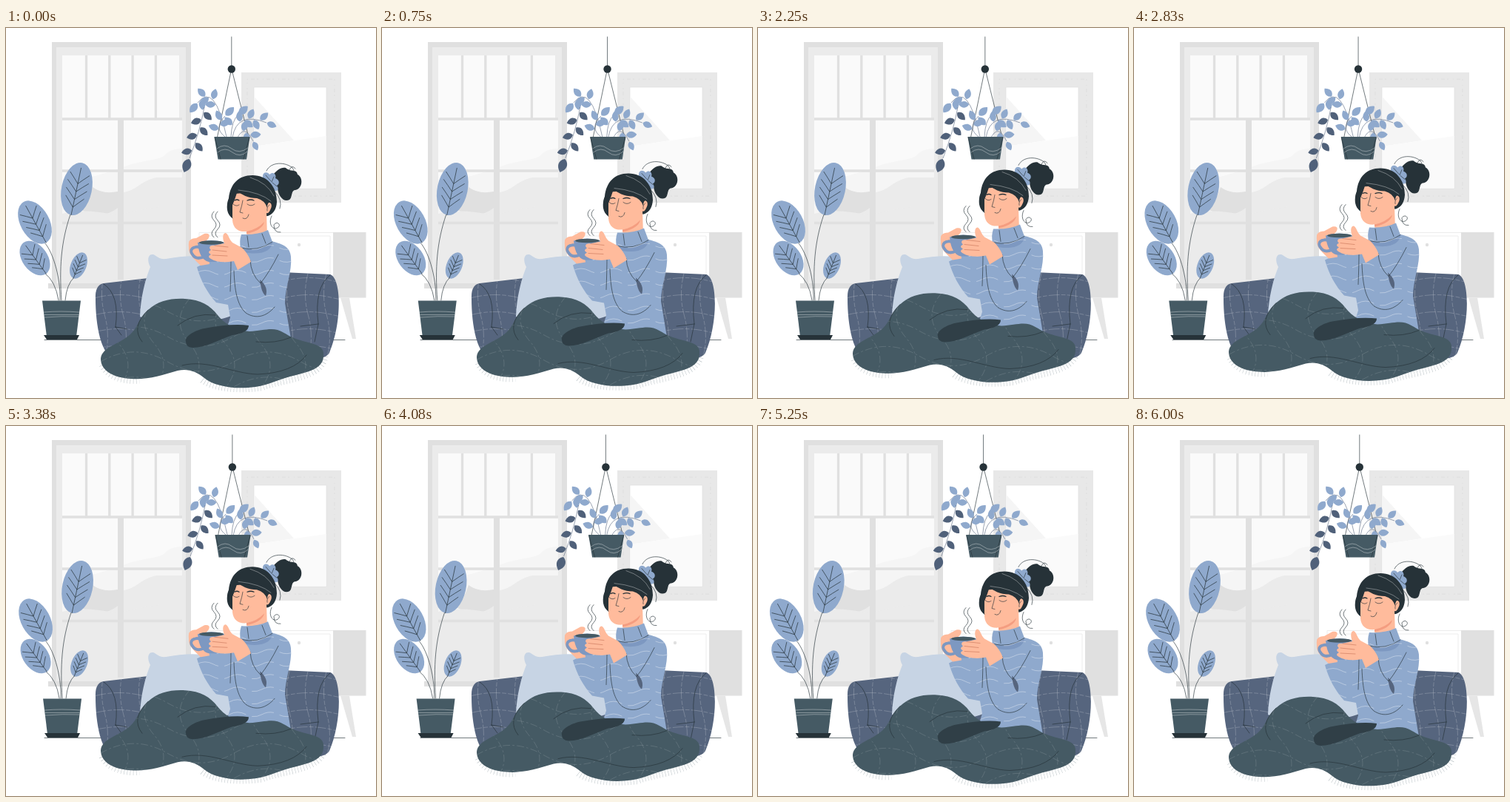
These frames come from a looping animation (500 px wide and 500 px high, 6.04 s). An HTML page:

```html
<!DOCTYPE html>
<html lang="en">
<head>
<meta charset="utf-8">
<title>Warm drink at home</title>
<style>
html,body{margin:0;width:100%;height:100%;overflow:hidden;background:#fff}
svg{display:block;width:100vw;height:100vh}
.ln{fill:none;stroke:#263238;stroke-width:.65;stroke-linecap:round}
.wh{fill:none;stroke:#fff;stroke-width:.6;stroke-linecap:round;opacity:.6}
.blue{fill:#8fa9cd}.cup{fill:#7d98c1}.slate{fill:#56657e}.teal{fill:#455a64}.ink{fill:#263238}.skin{fill:#ffbb9c}
.g0{fill:#e0e0e0}.g1{fill:#ebebeb}.g2{fill:#f5f5f5}.g3{fill:#fafafa}
</style>
</head>
<body>
<svg viewBox="0 0 500 500">
<defs>
<path id="sofa" d="M121 366Q120 347 132 345L192 338L250 330H374L438 333C454 338 454 400 437 439Q432 447 415 447H150C128 447 121 400 121 366Z"/>
<path id="body" d="M258 323L319 294L358 288C376 292 384 297 385 309C387 329 377 350 377 372L385 420L296 414L303 391L300 374L284 371C272 358 263 341 258 323Z"/>
<path id="throw" d="M128 447C129 431 154 427 168 414C179 404 178 394 192 381C205 369 222 365 242 366C263 367 276 375 286 388C295 399 306 407 329 410C345 409 357 405 367 408C380 413 383 418 398 422C414 427 431 428 429 443C429 459 412 464 392 469C369 474 357 482 337 485C309 489 281 484 268 473C257 464 246 460 232 463C211 469 190 476 169 474C147 473 128 464 128 447Z"/>
</defs>

<!-- window -->
<path class="g0" d="M62 19H250V345H254V352H57V345H62Z"/>
<path class="g1" d="M68 26H243V345H68Z"/>
<path class="g3" d="M76 37H234V123H238V262H76Z"/>
<path class="g2" d="M76 222C100 200 130 200 159 188C180 178 210 180 216 170Q224 163 238 163V262H76Z"/>
<path class="g1" d="M151 222C175 224 180 206 204 202H238V262H130Z"/>
<path class="g0" d="M102 246Q110 235 117 215Q130 225 151 221V243Q130 260 102 246Z"/>
<path class="g1" d="M76 251Q104 243 151 253Q200 240 238 240V345H76Z"/>
<g id="bars" fill="none" stroke="#e0e0e0" stroke-width="3.3"></g>
<path class="g0" d="M151 124H159V340H151Z"/>
<!-- picture -->
<path fill="#e8e8e8" d="M318 60H453V236H318Z"/>
<path fill="#fff" stroke="#e0e0e0" stroke-width=".7" d="M335 80H433V217H335Z"/>
<path class="g2" d="M335.500 93L389 152L335.500 160Z"/>
<path class="g3" d="M335.500 160L432.500 146V216.500H335.500Z"/>
<path fill="none" stroke="#dedede" stroke-dasharray="1 4 5 3 2 6" d="M326 69H444V227H326Z"/>
<!-- cabinet -->
<path fill="#fff" stroke="#ececec" d="M261 276.500H443V364H261ZM356 281H438V333H356ZM265 281H352V333H265Z"/>
<circle class="g0" cx="396" cy="293" r="2.200"/>
<path class="g0" d="M442 276H486.500V364.500H442Z"/>
<path fill="#e6e6e6" d="M452 364.500H464L473 420H468Z"/>
<path class="ln" d="M52 421.500H458"/>

<!-- hanging plant -->
<g class="sway">
<path class="ln" d="M304.800 12V55L285 150M304.800 55L328 148"/>
<circle class="ink" cx="304.800" cy="55.500" r="5.200"/>
<g id="vines"></g>
<path class="teal" d="M281.500 147H329.500L325 177.500H286.500Z"/>
<path class="ln" d="M282 148L290 177M329 148L321 177"/>
<path class="wh" d="M285 163q10-8 20 0t22-1M286 168q10-8 20 0t20-1"/>
</g>

<!-- floor plant -->
<g class="sway">
<path class="ln" d="M75 368C72 325 74 290 87 252M73 368C74 335 62 298 50 288M71 368Q67 342 52 331M80 368Q82 346 92 337"/>
<g id="foliage"></g>
<path class="teal" d="M49 368.500H101L95 417H55Z"/>
<path class="ink" d="M51 415H99L96 421H55Z"/>
<path class="wh" d="M51 384Q74 382 99 384M52 387.500H98M52 391Q76 389 98 390"/>
</g>

<!-- sofa -->
<use href="#sofa" class="slate"/>
<g id="sofaWeave"></g>
<path class="ln" d="M132 346Q154 360 148 404M148 404L164 407M148 404L156 415M438 334Q416 350 422 400M422 400L398 403M422 400L417 424"/>
<!-- cushion -->
<path fill="#c7d4e4" d="M181 390C182 364 188 340 195 323C190 313 192 305 199 306C204 308 207 313 216 312C234 309 250 307 264 309C284 322 304 356 306 388C290 398 210 404 181 390Z"/>

<!-- woman, cup and blanket -->
<g id="rise">
<path fill="none" stroke="#455a64" stroke-opacity=".4" stroke-width="11" stroke-dasharray=".5 3.500" d="M131 455C138 470 158 477 180 475M266 475C280 486 312 489 345 485C370 474 428 474 430 442"/>

<!-- bun and stray hair -->
<path class="ln" d="M352 193C358 180 378 181 387 189C393 197 383 199 383 192Q386 184 391 190M363 221Q374 232 370 244M359 254C354 264 360 274 367 270C373 266 366 260 362 266Q362 277 371 276"/>
<path class="ink" d="M355 207C362 196 369 187 378 189C384 195 393 190 394 198C402 202 401 217 391 219C385 219 387 230 383 232C375 236 368 227 367 217L358 214Z"/>
<path class="blue" d="M347 200C347 194 354 194 356 198C361 193 366 198 364 203C370 205 370 211 366 213C370 218 366 222 361 219C356 218 354 213 355 210C349 209 346 205 347 200Z"/>
<path class="ln" d="M351 199L358 207M362 201L359 208M366 214L360 209"/>

<!-- head -->
<path class="ink" d="M306 257C298 252 297 240 301 230C303 211 314 199 333 199C353 199 366 214 366 235Q365 250 354 254Z"/>
<path class="skin" d="M309 224L334 222L352 237C358 233 361 240 357 246Q355 251 352 250L353 282L326 284L325 275C314 276 307 271 306 260L306 238Z"/>
<path fill="#f49d80" d="M325 275Q340 272 349 262Q347 273 325 278Z"/>
<path class="ink" d="M304 240C305 220 314 207 327 203C350 203 362 219 362 236Q353 232 353 243Q350 233 339 230C328 230 317 225 313 220Q310 230 305 242Z"/>
<path class="wh" d="M314 219Q344 222 358 234M330 202Q353 209 362 227"/>
<path class="ln" d="M303 227Q294 246 306 257M307 238Q311 242 315 239M326 238Q331 242 336 238M320 233Q319 240 316 249L320 250M356 239Q352 242 353 247M320 257Q326 260 328 252"/>
<path class="ln" style="stroke-width:1.300" d="M309 233Q312 231 315 233M326 233Q331 231 335 233"/>

<!-- sweater -->
<use href="#body" class="blue"/>
<path class="cup" d="M317 293Q340 303 360 289C360 301 344 309 318 302Z"/>
<path class="blue" d="M318 279Q340 280 354 273L360 289C350 299 330 302 317 297Q315 288 318 279Z"/>
<path class="ln" d="M317 297Q340 303 360 289M326 281L328 296M346 278L351 291"/>
<g id="knit"></g>
<path class="slate" d="M343 340Q355 350 351 362Q345 358 343 340Z"/>
<path class="ln" d="M368 306Q356 330 344 345Q331 333 330 314M308 328C309 354 312 374 324 385C338 394 352 390 363 377M303 356Q304 330 304 314"/>

<!-- steam -->
<path class="ln" d="M281 248q-6 6 0 12t0 12t0 11M286 248q-6 6 0 12t0 12t0 11"/>

<!-- hands and cup -->
<path class="skin" d="M263 321C254 312 246 306 247 296C246 288 249 284 257 284L268 278C277 276 276 283 271 287L275 319Z"/>
<path fill="none" stroke="#7d98c1" stroke-width="4" d="M264 297C253 293 247 300 252 306Q257 314 268 309"/>
<path class="cup" d="M259 290Q277 284 296 290C296 306 291 316 282 316H274Q261 313 259 290Z"/>
<ellipse class="teal" cx="277.500" cy="290" rx="16.500" ry="2.800"/>
<ellipse class="skin" cx="253" cy="290" rx="6" ry="4.500"/>
<path class="skin" d="M295 291C292 283 293 277 297 277C301 279 301 285 306 290L319 297C324 302 329 309 331 316L313 327L308 315C296 317 285 317 277 312Q271 309 277 306Q271 303 277 300C273 297 276 293 281 294Z"/>
<path class="ln" style="stroke:#c9775c" d="M279 300L298 302M279 307L299 308M282 294L300 296"/>

<!-- blanket -->
<use href="#throw" class="teal"/>
<g id="throwWeave"></g>
<path fill="#303f47" d="M243 424C241 417 254 409 268 406Q305 399 328 402Q328 412 306 415C288 421 270 432 252 432Q243 431 243 424Z"/>
<path class="ln" d="M192 381Q168 404 184 424M283 388Q254 384 232 402M238 456C272 447 306 467 340 468Q388 466 406 442M385 418Q364 427 338 424"/>
</g>
</svg>
<script>
const $ = id => document.getElementById(id);
const LIGHT = '#8fa9cd', DARK = '#50617a';

// Window bars: four uprights above three rails
let bars = '';
for (let x = 108.500; x < 204; x += 31.300) bars += `M${x} 37V122`;
for (const y of [123, 193, 263.500]) bars += `M76 ${y}H238`;
$('bars').innerHTML = `<path d="${bars}"/>`;

// Wavy threads clipped to a shape; without gapX only rows are drawn
function weave(id, shape, { gapX, gapY, wave, swell, dash, fade }) {
  const { x, y, width: w, height: h } = $(shape).getBBox();
  let d = '';
  for (let v = gapY / 2; v < h; v += gapY) {
    d += `M${x} ${y + v}q${wave / 2} ${-swell} ${wave} 0` + `t${wave} 0`.repeat(w / wave);
  }
  for (let u = gapX / 2; u < w; u += gapX) {
    d += `M${x + u} ${y}q${-swell} ${h / 4} 0 ${h / 2}t0 ${h / 2}`;
  }
  $(id).innerHTML = `<clipPath id="${id}Clip"><use href="#${shape}"/></clipPath>
  <path class="wh" clip-path="url(#${id}Clip)" style="opacity:${fade}" stroke-dasharray="${dash}" d="${d}"/>`;
}

// Leaves along a quadratic stem, alternating sides, one at the tip
function vine(x0, y0, cx, cy, x1, y1, count, color, tip = 1, from = .4) {
  const at = (a, b, c, t) => (1 - t) ** 2 * a + 2 * t * (1 - t) * b + t * t * c;
  const slope = (a, b, c, t) => (1 - t) * (b - a) + t * (c - b);
  let out = `<path fill="none" stroke="#56657e" stroke-width=".6" d="M${x0} ${y0}Q${cx} ${cy} ${x1} ${y1}"/>`;
  for (let i = 0; i < count; i++) {
    const t = from + (1 - from) * i / (count - 1), last = i === count - 1;
    const dir = Math.atan2(slope(y0, cy, y1, t), slope(x0, cx, x1, t)) * 180 / Math.PI;
    const turn = dir + (last ? 0 : i % 2 ? 58 : -58);
    out += `<path fill="${color}" transform="translate(${at(x0, cx, x1, t)} ${at(y0, cy, y1, t)})
    rotate(${turn}) scale(${last ? tip : .9})" d="M1 0C5-7 12-6 17 0C12 6 5 7 1 0Z"/>`;
  }
  return out;
}
$('vines').innerHTML =
  vine(298, 147, 282, 72, 259, 101, 6, LIGHT) +
  vine(296, 147, 280, 135, 296, 119, 4, LIGHT) +
  vine(304, 147, 305, 125, 314, 117, 2, LIGHT) +
  vine(306, 148, 312, 112, 352, 128, 6, LIGHT, .85) +
  vine(312, 150, 322, 128, 334, 153, 4, LIGHT, .8) +
  vine(268, 107, 262, 140, 248, 176, 7, DARK, 1.200, .1);

// Large oval leaf with a midrib and paired veins
function oval(x, y, rx, ry, turn) {
  let veins = `M0 ${ry}V${-ry * .8}`;
  for (let k = -.4; k < .6; k += .3) {
    const w = rx * .7 * Math.sqrt(1 - k * k), top = (k - .18) * ry, foot = (k + .2) * ry;
    veins += `M${-w} ${top}Q${-w * .5} ${k * ry} 0 ${foot}Q${w * .5} ${k * ry} ${w} ${top}`;
  }
  return `<g transform="translate(${x} ${y}) rotate(${turn})">
  <ellipse class="blue" rx="${rx}" ry="${ry}"/><path class="ln" d="${veins}"/></g>`;
}
$('foliage').innerHTML = oval(95.500, 217.500, 20.500, 36, 12) + oval(39, 262.500, 19.500, 31.500, -29)
  + oval(39, 311, 17, 26, -36) + oval(98, 321, 10.500, 18.500, 22);

weave('sofaWeave', 'sofa', { gapX: 25, gapY: 23, wave: 64, swell: 8, dash: '14 3 5 3', fade: .35 });
weave('knit', 'body', { gapY: 17, wave: 22, swell: 6, dash: '30 9', fade: .6 });
weave('throwWeave', 'throw', { gapX: 48, gapY: 34, wave: 90, swell: 26, dash: '9 4 2 4', fade: .22 });

const LOOP = 6040, CYCLE = 6000;
const shake = [0, -1, 2, -4, 4, -4, 4, -4, 2, -1, 0, 0];
const plants = document.querySelectorAll('.sway');

function frame() {
  const p = Math.min(performance.now() % LOOP / CYCLE, 1);
  const i = Math.floor(p * 10);
  const dx = shake[i] + (shake[i + 1] - shake[i]) * (p * 10 - i);
  const dy = -10 * (1 - Math.abs(1 - 2 * p));
  plants.forEach(el => el.setAttribute('transform', `translate(${dx} 0)`));
  $('rise').setAttribute('transform', `translate(0 ${dy})`);
  requestAnimationFrame(frame);
}
frame();
</script>
</body>
</html>
```
